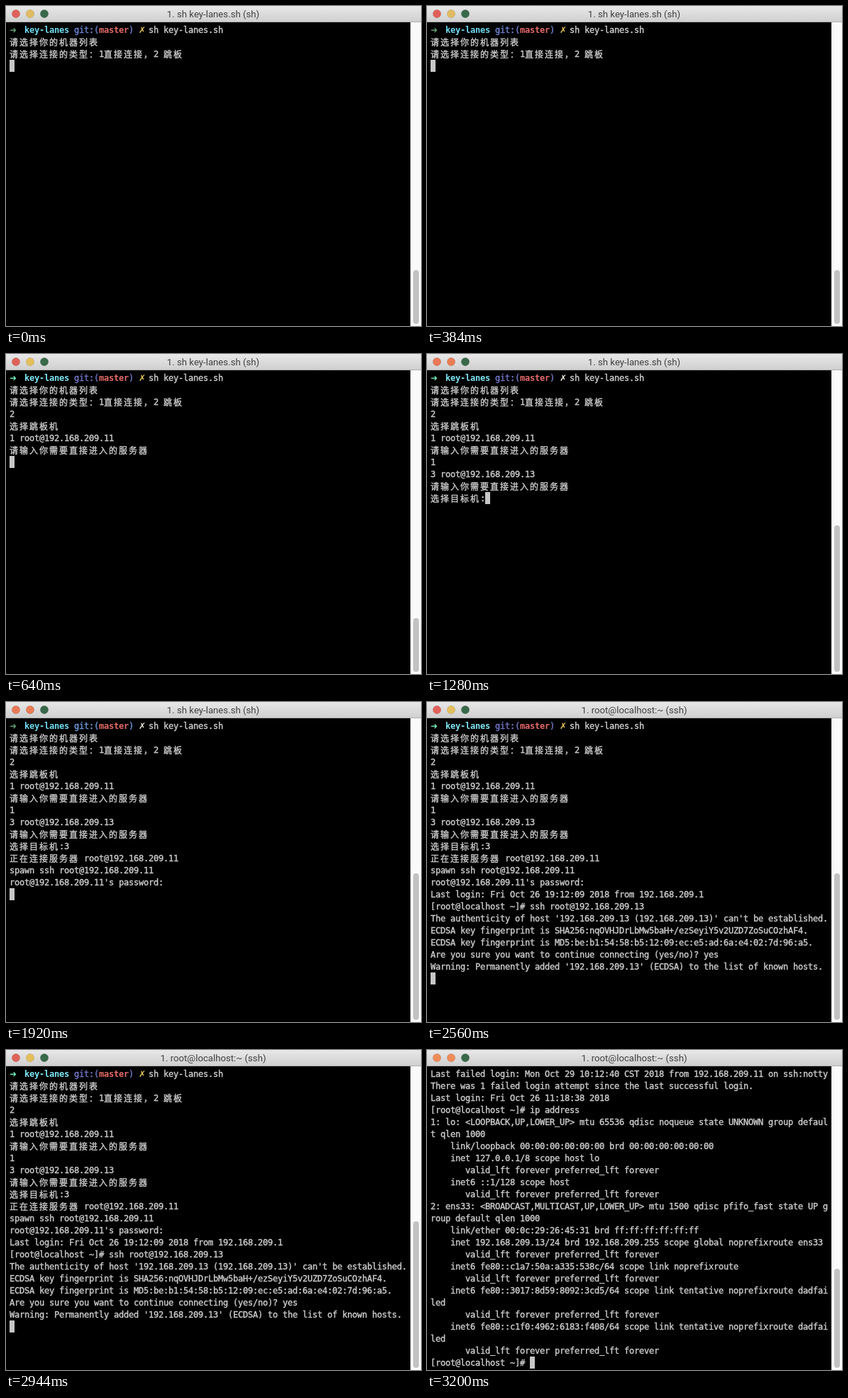
An HTML page with a canvas for the animation above (3840 ms loop, 585 px wide and 452 px high).

```html
<!DOCTYPE html>
<html lang="zh">
<meta charset="utf-8">
<title>Terminal session</title>
<style>
  html, body { margin: 0; width: 585px; height: 452px; overflow: hidden; background: #000; }
  canvas { display: block; }
</style>
<canvas id="stage" width="585" height="452"></canvas>
<script>
const ctx = document.getElementById('stage').getContext('2d');
const STEP = 640, CELL = 7, ROW = 17, COLS = 80, LEFT = 5, TOP = 25;
const TEXT = '#cacaca';
const WIDE = /[\u2e80-\uffef]/, DINGBAT = /[\u2700-\u27bf]/;
const MONO = '12px "DejaVu Sans Mono", monospace';
const SYMBOL = '12px "DejaVu Sans", sans-serif';
const CJK = '12px "Noto Sans CJK SC", "Noto Sans CJK", sans-serif';

// Text that each step adds to the session.
const session = [
`sh key-lanes.sh
请选择你的机器列表
请选择连接的类型：1直接连接，2 跳板
`,
`2
选择跳板机
1 root@192.168.209.11
请输入你需要直接进入的服务器
`,
`1
3 root@192.168.209.13
请输入你需要直接进入的服务器
选择目标机:`,
`3
正在连接服务器 root@192.168.209.11
spawn ssh root@192.168.209.11
root@192.168.209.11's password:
`,
`Last login: Fri Oct 26 19:12:09 2018 from 192.168.209.1
[root@localhost ~]# ssh root@192.168.209.13
The authenticity of host '192.168.209.13 (192.168.209.13)' can't be established.
ECDSA key fingerprint is SHA256:nqOVHJDrLbMw5baH+/ezSeyiY5v2UZD7ZoSuCOzhAF4.
ECDSA key fingerprint is MD5:be:b1:54:58:b5:12:09:ec:e5:ad:6a:e4:02:7d:96:a5.
Are you sure you want to continue connecting (yes/no)? yes
Warning: Permanently added '192.168.209.13' (ECDSA) to the list of known hosts.
`];

const lifetime = '       valid_lft forever preferred_lft forever';
const remote =
`Last failed login: Mon Oct 29 10:12:40 CST 2018 from 192.168.209.11 on ssh:notty
There was 1 failed login attempt since the last successful login.
Last login: Fri Oct 26 11:18:38 2018
[root@localhost ~]# ip address
1: lo: <LOOPBACK,UP,LOWER_UP> mtu 65536 qdisc noqueue state UNKNOWN group default qlen 1000
    link/loopback 00:00:00:00:00:00 brd 00:00:00:00:00:00
    inet 127.0.0.1/8 scope host lo
${lifetime}
    inet6 ::1/128 scope host
${lifetime}
2: ens33: <BROADCAST,MULTICAST,UP,LOWER_UP> mtu 1500 qdisc pfifo_fast state UP group default qlen 1000
    link/ether 00:0c:29:26:45:31 brd ff:ff:ff:ff:ff:ff
    inet 192.168.209.13/24 brd 192.168.209.255 scope global noprefixroute ens33
${lifetime}
    inet6 fe80::c1a7:50a:a335:538c/64 scope link noprefixroute
${lifetime}
    inet6 fe80::3017:8d59:8092:3cd5/64 scope link tentative noprefixroute dadfailed
${lifetime}
    inet6 fe80::c1f0:4962:6183:f408/64 scope link tentative noprefixroute dadfailed
${lifetime}
[root@localhost ~]# `;

// Per step: close and minimise buttons, prompt arrow, folder, git label, cross.
const tints = [
  ['#e0605a', '#e0bb62', '#5f9f72', '#6fdcf2', '#6f86d6', '#e8c860'],
  ['#e0625a', '#e3bf5c', '#6fe8b4', '#7fe6f4', '#7478c8', '#e8c860'],
  ['#ea7856', '#ea7c54', '#6fe8b4', '#7fe6f4', '#7478c8', '#f4f0e0'],
  ['#ea7856', '#ea7c54', '#5f9f72', '#6fdcf2', '#6f9ae0', '#f4f0e0'],
  ['#e0625a', '#e3bf5c', '#6fe8b4', '#7fe6f4', '#7478c8', '#e8c860'],
  ['#f08c58', '#f08c58']
];
const thumbTops = [373, 373, 242, 242, 242, 309];

let col, row;

// Writes on the cell grid; a thin outline gives the terminal's heavier strokes.
function put(text, color = TEXT, bold = false) {
  ctx.fillStyle = ctx.strokeStyle = color;
  ctx.lineWidth = 0.4;
  for (const ch of text) {
    if (ch === '\n') { col = 0; row++; continue; }
    const wide = WIDE.test(ch), span = wide ? 2 : 1;
    if (col + span > COLS) { col = 0; row++; }
    const font = wide ? CJK : DINGBAT.test(ch) ? SYMBOL : MONO;
    ctx.font = (bold ? 'bold ' : '') + font;
    const x = LEFT + col * CELL, y = TOP + row * ROW + (wide ? 14 : 13);
    ctx.fillText(ch, x, y);
    if (!bold) ctx.strokeText(ch, x, y);
    col += span;
  }
}

function rect(color, x, y, w, h) {
  ctx.fillStyle = color;
  ctx.fillRect(x, y, w, h);
}

function dot(color, x) {
  ctx.fillStyle = color;
  ctx.strokeStyle = 'rgba(0, 0, 0, 0.1)';
  ctx.lineWidth = 1;
  ctx.beginPath();
  ctx.arc(x, 11, 5.7, 0, 7);
  ctx.fill();
  ctx.stroke();
}

function drawWindow(step) {
  rect('#000', 0, 0, 585, 452);
  const bar = ctx.createLinearGradient(0, 0, 0, 22);
  bar.addColorStop(0, '#e8e8e8');
  bar.addColorStop(1, '#d0d0d0');
  rect(bar, 0, 0, 585, 22);
  rect('#b0b0b0', 0, 22, 585, 1);
  dot(tints[step][0], 14);
  dot(tints[step][1], 34);
  dot('#38694a', 54);

  ctx.font = '13.2px Roboto, sans-serif';
  ctx.textAlign = 'center';
  ctx.fillStyle = '#404040';
  ctx.fillText(step < 4 ? '1. sh key-lanes.sh (sh)' : '1. root@localhost:~ (ssh)', 292, 16);
  ctx.textAlign = 'left';

  rect('#fafafa', 570, 23, 15, 429);
  rect('#e6e6e6', 570, 23, 1, 429);
  ctx.fillStyle = '#c2c2c2';
  ctx.beginPath();
  ctx.roundRect(574, thumbTops[step], 8, 449 - thumbTops[step], 4);
  ctx.fill();
}

function drawPrompt([, , arrow, folder, git, cross]) {
  put('➜  ', arrow, true);
  put('key-lanes ', folder, true);
  put('git:(', git);
  put('master', '#e56a6a', true);
  put(') ', git);
  put('✗ ', cross, true);
}

function draw(now) {
  const step = Math.floor(now / STEP) % 6;
  drawWindow(step);
  col = row = 0;
  if (step < 5) {
    drawPrompt(tints[step]);
    put(session.slice(0, step + 1).join(''));
  } else {
    put(remote);
  }
  rect('#c7c7c7', LEFT + col * CELL, TOP + row * ROW, CELL, ROW);
}

const start = performance.now();
function tick() {
  draw(performance.now() - start);
  requestAnimationFrame(tick);
}
tick();
</script>
</html>
```
